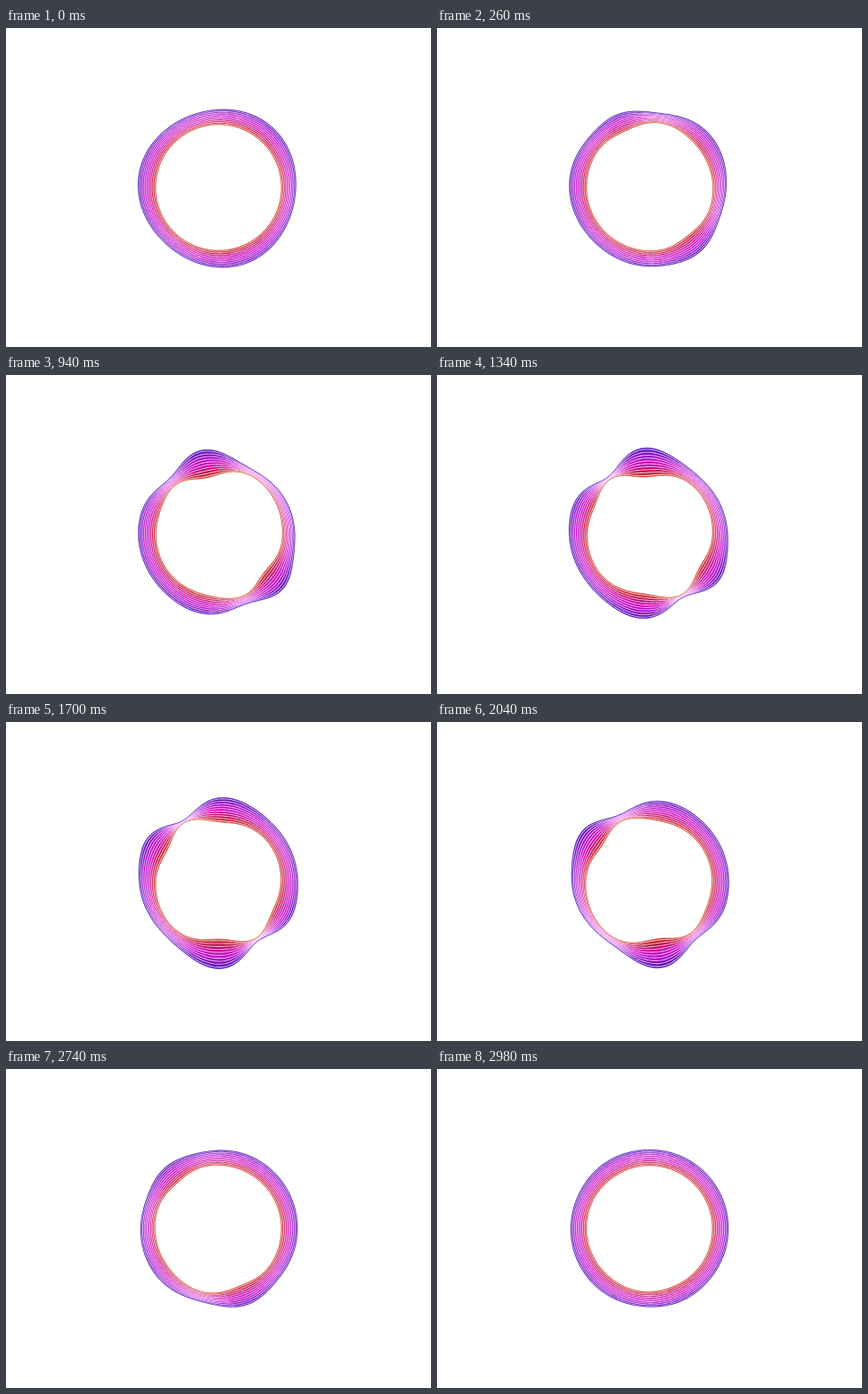
Animation of 480x360 px, one loop 3 s. Source, as an HTML page with a canvas:

```html
<!DOCTYPE html>
<html>
<head>
<meta charset="utf-8">
<style>
html, body { margin: 0; width: 100%; height: 100%; overflow: hidden; background: #fff; }
canvas { display: block; }
</style>
</head>
<body>
<canvas id="stage" width="480" height="360"></canvas>
<script>
const ctx = document.getElementById('stage').getContext('2d');
const LOOP = 3000, CX = 240, CY = 180, STEPS = 240, BANDS = 10;
const OUTER = 89, INNER = 71, SWELL = 10, INNER_SHARE = 0.65;
const AXIS = -33 * Math.PI / 180;  // the wave runs along this diagonal
const WAVELENGTH = 1.22;           // in ring radii

// Ribbon colours from the outer to the inner edge
const ramp = [[66, 14, 172], [116, 10, 184], [180, 4, 200], [202, 4, 196], [192, 4, 130], [190, 16, 46], [206, 62, 32]];

const mix = (a, b, s) => a + (b - a) * s;

function colorAt(u) {
  const x = u * (ramp.length - 1), i = Math.min(Math.floor(x), ramp.length - 2);
  return `rgb(${ramp[i].map((v, k) => Math.round(mix(v, ramp[i + 1][k], x - i)))})`;
}

// A plane wave crosses the ring one way while its envelope drifts the other way
function swellAt(angle, p) {
  const x = Math.cos(angle - AXIS);
  const wave = Math.cos(2 * Math.PI * ((x + 0.03) / WAVELENGTH - p));
  const packet = Math.exp(-0.7 * (x - Math.cos(Math.PI * p)) ** 2);
  const strength = Math.sin(Math.PI * p) ** 0.6;
  const sideways = 1 - 0.7 * Math.cos(angle) ** 4;
  return SWELL * wave * packet * strength * sideways;
}

function edgesAt(p) {
  return Array.from({ length: STEPS }, (_, n) => {
    const angle = n / STEPS * 2 * Math.PI, swell = swellAt(angle, p);
    const lobes = 2 * (1 - p) ** 2 * Math.cos(3 * angle + 2.6);
    return { cos: Math.cos(angle), sin: Math.sin(angle), outer: OUTER + swell + lobes, inner: INNER - swell * INNER_SHARE };
  });
}

function trace(edges, u) {
  ctx.beginPath();
  for (const e of edges) {
    const r = mix(e.outer, e.inner, u);
    ctx.lineTo(CX + r * e.cos, CY + r * e.sin);
  }
  ctx.closePath();
}

function fill(edges, u, color) {
  trace(edges, u);
  ctx.fillStyle = color;
  ctx.fill();
}

function stroke(edges, u, color, width) {
  trace(edges, u);
  ctx.strokeStyle = color;
  ctx.lineWidth = width;
  ctx.stroke();
}

function draw(p) {
  const edges = edgesAt(p);
  ctx.clearRect(0, 0, 480, 360);
  for (let i = 0; i < BANDS; i++) fill(edges, i / BANDS, colorAt((i + 0.5) / BANDS));
  fill(edges, 1, '#fff');
  for (let i = 0; i < BANDS; i++) stroke(edges, (i + 0.5) / BANDS, 'rgba(255, 222, 255, .8)', 1.1);
  stroke(edges, 0, '#4a22c4', 0.8);
  stroke(edges, 1, '#e0603c', 0.8);
}

const start = performance.now();
function tick() {
  draw((performance.now() - start) % LOOP / LOOP);
  requestAnimationFrame(tick);
}
tick();
</script>
</body>
</html>
```
